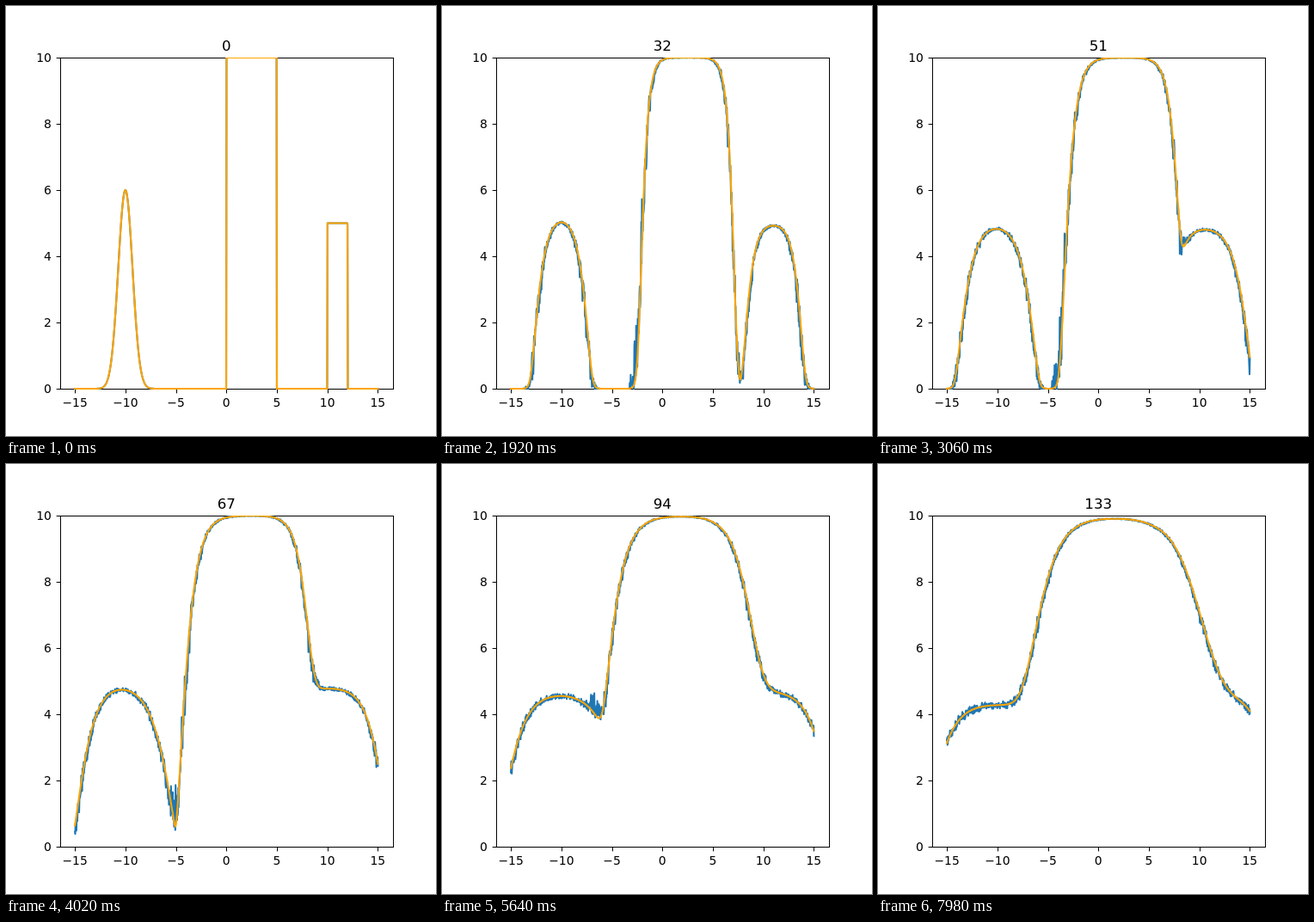
Write an HTML page that moves like this. It is 500 by 500 pixels and loops after 8 s.

```html
<!DOCTYPE html>
<html lang="en">
<head>
<meta charset="utf-8">
<title>Spreading profile</title>
<style>
  html, body { margin: 0; width: 100%; height: 100%; overflow: hidden; background: #fff; }
  svg { display: block; width: 100vw; height: 100vh; }
  text { font: 13.89px "DejaVu Sans", sans-serif; fill: #000; text-anchor: middle; }
  #title { font-size: 16.67px; }
  #yTicks text { text-anchor: end; }
  .axis { fill: none; stroke: #000; stroke-width: 1; }
  .curve { fill: none; stroke-width: 2.083; stroke-linejoin: round; stroke-linecap: square; }
</style>
</head>
<body>
<svg viewBox="0 0 500 500">
  <clipPath id="plot"><rect x="63" y="60" width="387" height="386"/></clipPath>
  <rect class="axis" x="63.5" y="60.5" width="387" height="385"/>
  <g id="xTicks"></g>
  <g id="yTicks"></g>
  <g clip-path="url(#plot)">
    <path id="noisy" class="curve" stroke="#1f77b4"/>
    <path id="smooth" class="curve" stroke="#ffa500"/>
  </g>
  <text id="title" x="256.25" y="52">0</text>
</svg>
<script>
const STEP = 60, LOOP = 8000, SAMPLES = 1000;
const px = x => 256.25 + x * 387.5 / 33;
const py = y => 445 - y * 38.5;
const byId = id => document.getElementById(id);

// Each bump: height, left foot, left front width, right foot, right front width.
const KEYS = [
  { k: 0,   mid: [10, 0, .001, 5, .001],           left: [7.4, -11.4, 1, -8.6, 1],          right: [5, 10, .001, 12, .001] },
  { k: 32,  mid: [10, -2.42, .86, 7.42, .87],      left: [5.25, -13.05, 1.35, -6.95, 1.35], right: [5, 7.85, 1.13, 14.15, 1.13] },
  { k: 51,  mid: [10, -3.82, 1.34, 8.6, 1.25],     left: [5, -14.2, 1.73, -5.85, 1.8],      right: [4.9, 6.5, 1.5, 15.35, 1.85] },
  { k: 67,  mid: [10, -5, 1.72, 8.95, 1.45],       left: [4.95, -15.25, 2.12, -4.8, 2.5],   right: [4.82, 5, 1.7, 16.15, 2] },
  { k: 94,  mid: [9.99, -6.65, 2.25, 9.85, 2.1],   left: [4.68, -16.4, 2.5, -3, 2.9],       right: [4.7, 4.5, 1.8, 17.2, 2.3] },
  { k: 114, mid: [9.97, -7.65, 2.75, 10.65, 2.45], left: [4.5, -17, 2.5, -1, 3],            right: [4.55, 4.5, 1.8, 17.6, 2.2] },
  { k: 133, mid: [9.94, -7.85, 2.7, 11.05, 2.7],   left: [4.32, -17.3, 2.5, -1, 3],         right: [4.5, 4.5, 1.8, 18, 2] }
];

function shapesAt(k) {
  const i = Math.max(1, KEYS.findIndex(key => key.k >= k));
  const a = KEYS[i - 1], b = KEYS[i], f = (k - a.k) / (b.k - a.k);
  const mix = name => a[name].map((v, j) => v + (b[name][j] - v) * f);
  return { mid: mix('mid'), left: mix('left'), right: mix('right') };
}

// Distance inside a front, with a soft toe of width e.
const inside = (s, e) =>
  Math.max(s, 0) + (e ? e * Math.log1p(Math.exp(-Math.abs(s) / e)) : 0);

const bump = (x, [h, a, ca, b, cb], ea, eb = ea) =>
  h * Math.tanh(inside(x - a, ea) / ca) * Math.tanh(inside(b - x, eb) / cb);

// The plateau's toes widen once it has met its neighbours.
function profile(x, k, shapes) {
  const toe = .15 * Math.min(1, k / 32), dome = Math.min(1, k / 24);
  const widen = start => Math.max(toe, .026 * (k - start));
  const gauss = 6 * Math.exp(-((x + 10) ** 2));
  const left = gauss * (1 - dome) + bump(x, shapes.left, toe) * dome;
  const mid = bump(x, shapes.mid, widen(80), widen(40));
  const right = bump(x, shapes.right, toe);
  return Math.min(10, (left ** 4 + mid ** 4 + right ** 4) ** .25);
}

function random(seed) {
  return () => {
    seed = (seed + 0x6D2B79F5) | 0;
    let t = Math.imul(seed ^ (seed >>> 15), 1 | seed);
    t = (t + Math.imul(t ^ (t >>> 7), 61 | t)) ^ t;
    return ((t ^ (t >>> 14)) >>> 0) / 4294967296;
  };
}

const near = (x, centre, radius) => Math.max(0, 1 - Math.abs(x - centre) / radius);

// Noise grows with the slope; spikes gather at the feet of the plateau.
function addNoise(xs, ys, k, shapes) {
  const rnd = random(k * 7919 + 1), grow = Math.min(1, k / 30);
  const fade = Math.max(0, 1 - k / 125), dx = xs[1] - xs[0];
  return ys.map((y, i) => {
    const x = xs[i];
    const slope = Math.abs((ys[i + 1] ?? y) - (ys[i - 1] ?? y)) / dx / 2;
    const base = .015 * k / 133 * (10 - y);
    const spread = y > .02 ? Math.min(.55, .01 + .13 * slope + base) : 0;
    const spikes = 3 * near(x, shapes.mid[1], .9) * fade
                 + 1.2 * near(x, shapes.mid[3], .5) * fade * fade;
    const jitter = (rnd() + rnd() - 1) * spread * 1.3 - Math.min(.25, .06 * slope);
    return Math.max(0, y + grow * (jitter + rnd() ** 2 * spikes));
  });
}

const xs = Array.from({ length: SAMPLES }, (_, i) => -15 + 30 * i / (SAMPLES - 1));
const toPath = ys =>
  'M' + ys.map((y, i) => px(xs[i]).toFixed(2) + ' ' + py(y).toFixed(2)).join('L');

function drawTicks() {
  const label = v => String(v).replace('-', '\u2212');
  const snap = v => Math.floor(v + .5) + .5;
  let html = '';
  for (let v = -15; v <= 15; v += 5) {
    html += `<path class="axis" d="M${snap(px(v))} 445.5v4.86"/><text x="${px(v)}" y="466">${label(v)}</text>`;
  }
  byId('xTicks').innerHTML = html;
  html = '';
  for (let v = 0; v <= 10; v += 2) {
    html += `<path class="axis" d="M63.5 ${snap(py(v))}h-4.86"/><text x="52.8" y="${py(v) + 5}">${v}</text>`;
  }
  byId('yTicks').innerHTML = html;
}

let shown = -1;
function render() {
  const k = Math.floor(performance.now() % LOOP / STEP);
  if (k !== shown) {
    shown = k;
    const shapes = shapesAt(k);
    const ys = xs.map(x => profile(x, k, shapes));
    byId('smooth').setAttribute('d', toPath(ys));
    byId('noisy').setAttribute('d', toPath(addNoise(xs, ys, k, shapes)));
    byId('title').textContent = k;
  }
  requestAnimationFrame(render);
}

drawTicks();
render();
</script>
</body>
</html>
```
